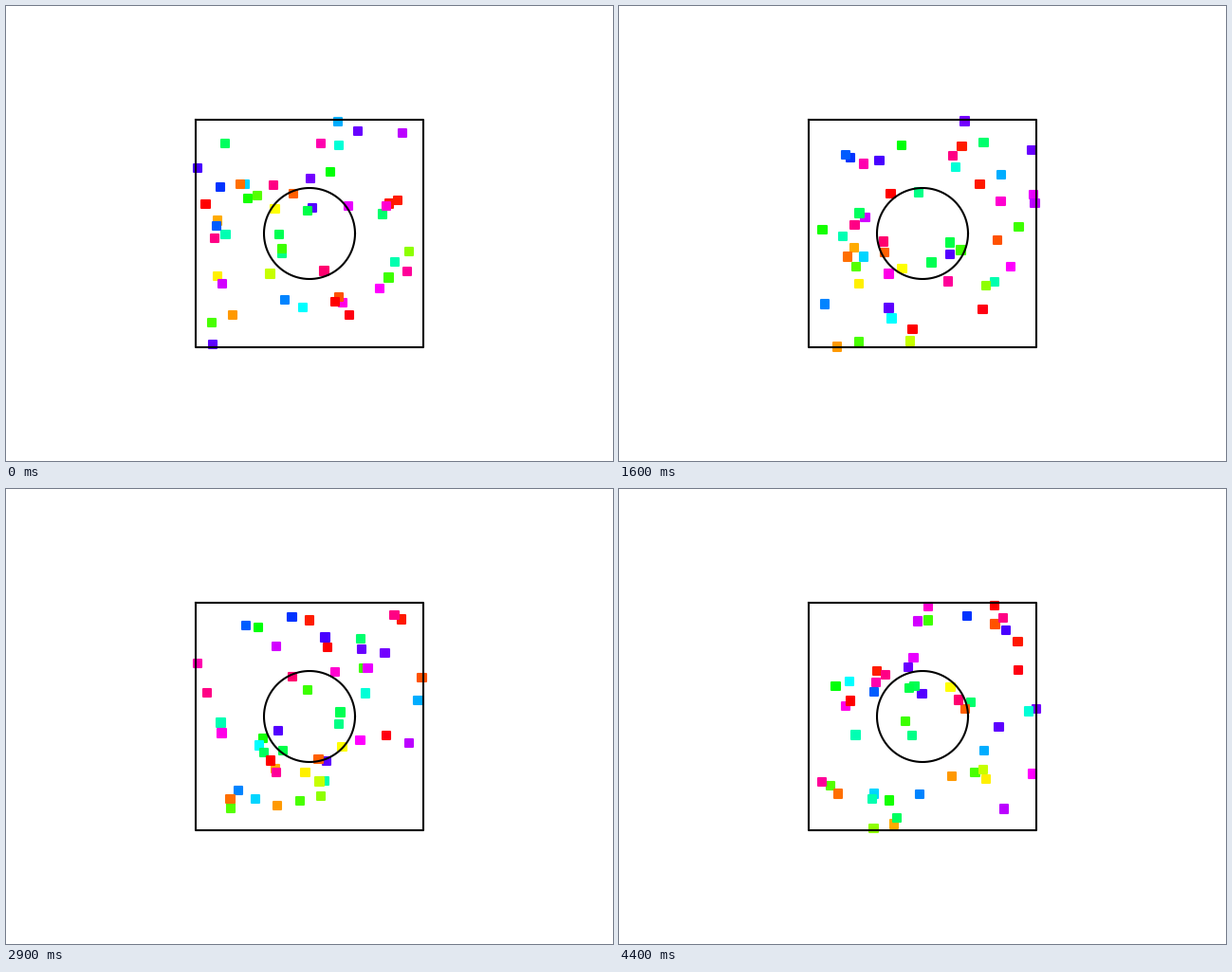
Write a matplotlib script that moves like this. It is 640 by 480 pixels and loops after 4.5 s.

```python
import numpy as np
import matplotlib.pyplot as plt
from matplotlib.animation import FuncAnimation
from matplotlib.colors import hsv_to_rgb

W, H, DPI = 640, 480, 100
FRAMES, INTERVAL = 45, 100
CENTER = np.array([320.0, 240.0])
HALF, RADIUS, SPEED = 120, 48, 4.8
EXTRA = 13

# Start x, start y, heading in degrees (y points down); bottom layer first
STARTS = [
    (401, 211, -3.8), (355, 313, -156.5), (394, 298, -17.6),
    (361, 211, -9), (228, 293, -65.7), (418, 134, 74.6),
    (321, 182, -55.6), (371, 132, 15.3), (218, 357, -30.2),
    (323, 213, 52.7), (202, 171, -174), (226, 191, -156.2),
    (222, 232, -77.1), (294, 310, 176.7), (350, 122, 46.7),
    (252, 188, 85.4), (313, 318, 109.3), (351, 147, -86.9),
    (410, 270, 15.7), (291, 261, -71.9), (231, 145, 72.9),
    (288, 241, 81.8), (318, 216, 26), (291, 256, 3.6),
    (217, 334, 155.7), (265, 200, 101.5), (425, 259, 27.9),
    (278.5, 282.4, 68), (283.4, 214.3, 143.1), (247, 188, 94.3),
    (303, 198, 148), (351, 307, -51.1), (347, 312, 119.2),
    (335.5, 279.5, 176.8), (282, 189, -23.8), (423, 280, 172.1),
    (332, 145, 163.8),
]

# Hue falls from magenta through blue, green and red to pink
HUE_KNOTS = [
    (0, 311), (5, 284), (6, 267), (10, 257), (11, 228), (20, 142), (22, 137),
    (23, 106), (25, 100), (28, 60), (29, 26), (31, 19), (32, 0), (33, -26),
    (36, -41),
]


def circle_distance(p, v, inside):
    b = p @ v
    disc = b * b - p @ p + RADIUS ** 2
    if inside:
        return -b + np.sqrt(disc)
    if b < 0 and disc > 0:
        return -b - np.sqrt(disc)
    return np.inf


def advance(p, v, inside, left):
    """Move along v for the given length, mirroring at walls and circle."""
    while True:
        walls = (np.sign(v) * HALF - p) / v
        axis = int(np.argmin(walls))
        ring = circle_distance(p, v, inside)
        hit = min(walls[axis], ring)
        if hit > left:
            return p + v * left, v
        p = p + v * hit
        left -= hit
        if ring <= walls[axis]:
            n = p / np.hypot(*p)
            v = v - 2 * (v @ n) * n
        else:
            v = v.copy()
            v[axis] *= -1


def trace(x, y, heading):
    p = np.array([x, y]) - CENTER
    a = np.radians(heading)
    v = np.array([np.cos(a), np.sin(a)])
    inside = np.hypot(*p) < RADIUS
    path = [p]
    for _ in range(FRAMES - 1):
        p, v = advance(p, v, inside, SPEED)
        path.append(p)
    return np.array(path) + CENTER


def scattered(rng):
    """Random start between the circle and the walls."""
    a = rng.uniform(0, 2 * np.pi)
    r = rng.uniform(RADIUS + 10, HALF)
    x, y = CENTER + r * np.array([np.cos(a), np.sin(a)])
    return x, y, rng.uniform(-180, 180)


rng = np.random.default_rng(4)
starts = [scattered(rng) for _ in range(EXTRA)] + STARTS
paths = np.stack([trace(*s) for s in starts], axis=1)

rank, hue = zip(*HUE_KNOTS)
hues = np.concatenate([rng.uniform(-40, 170, EXTRA),
                       np.interp(np.arange(len(STARTS)), rank, hue)])
full = np.ones_like(hues)
colors = hsv_to_rgb(np.column_stack([hues % 360 / 360, full, full]))

fig = plt.figure(figsize=(W / DPI, H / DPI), dpi=DPI, facecolor="white")
ax = fig.add_axes([0, 0, 1, 1])
ax.set(xlim=(0, W), ylim=(H, 0))
ax.axis("off")

cx, cy = CENTER
l, r, t, b = cx - HALF, cx + HALF, cy - HALF, cy + HALF
ax.plot([l, r, r, l, l], [t, t, b, b, t], color="black", lw=1.5)
turn = np.linspace(0, 2 * np.pi, 200)
ax.plot(cx + RADIUS * np.cos(turn), cy + RADIUS * np.sin(turn), color="black", lw=1.5)
dots = ax.scatter(*paths[0].T, s=36, c=colors, marker="s", linewidths=1.5, zorder=1)


def update(i):
    dots.set_offsets(paths[i])
    return [dots]


anim = FuncAnimation(fig, update, frames=FRAMES, interval=INTERVAL,
                     repeat=True, repeat_delay=0)
plt.show()
```
